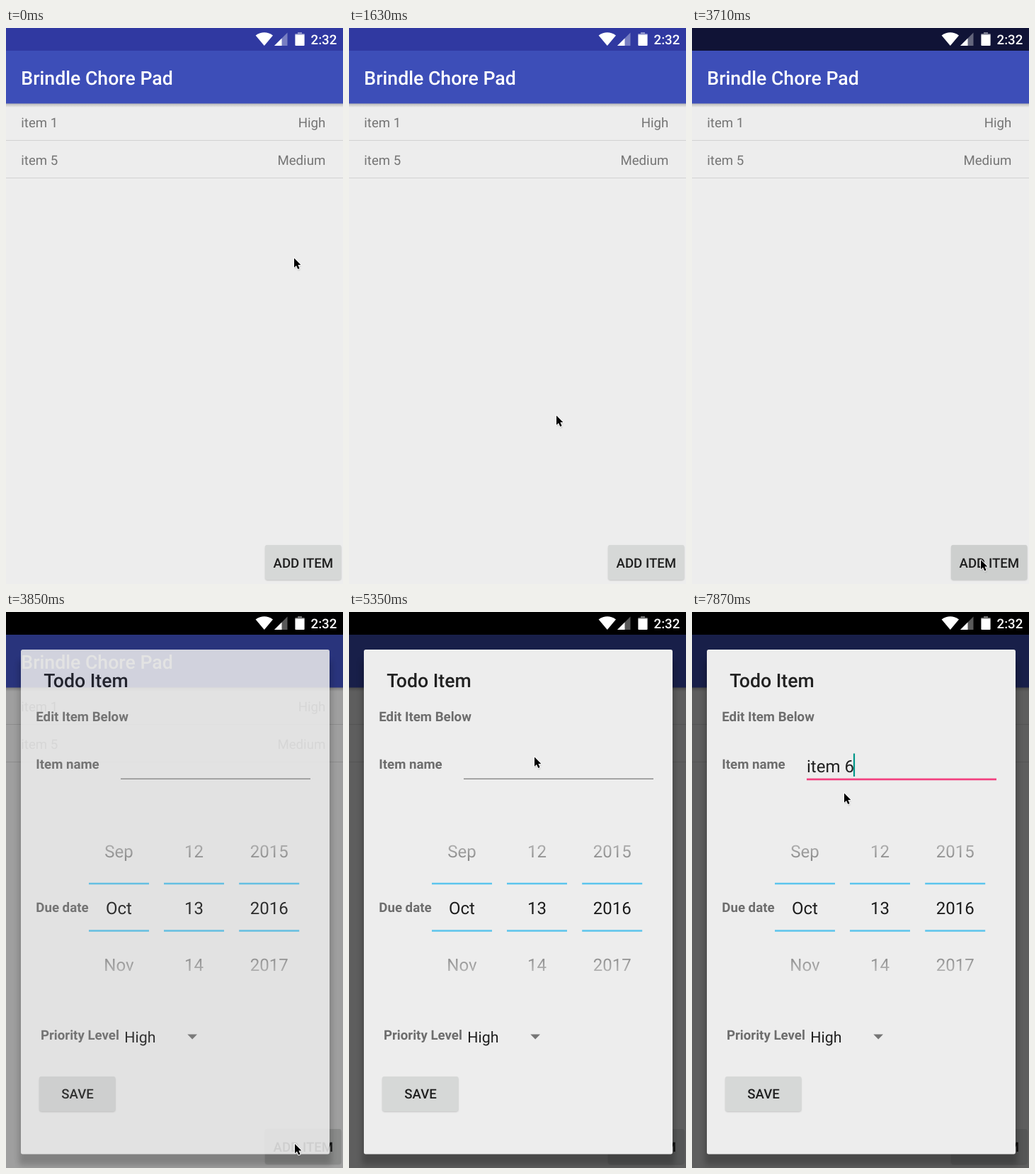
These frames come from a looping animation (476x784 px, 8 s). An HTML page:

```html
<!DOCTYPE html>
<html lang="en">
<head>
<meta charset="utf-8">
<title>Todo list</title>
<style>
  html, body { margin: 0; width: 100%; height: 100%; overflow: hidden; background: #ededed; }
  svg { display: block; width: 476px; height: 784px; }
  text { font-family: Roboto, sans-serif; font-size: 18.67px; text-rendering: geometricPrecision; white-space: pre; }
  .medium { font-weight: 500; }
  .title { font-size: 26.67px; font-weight: 500; }
  .row { fill: #757575; }
  .label { fill: #6d6d6d; font-weight: 700; }
  .pick { font-size: 24px; text-anchor: middle; fill: url(#fade); }
  .end { text-anchor: end; }
  .mid { text-anchor: middle; }
</style>
</head>
<body>
<svg viewBox="0 0 476 784">
  <defs>
    <linearGradient id="under" x1="0" y1="0" x2="0" y2="1">
      <stop offset="0" stop-color="#000" stop-opacity=".25"/>
      <stop offset="1" stop-color="#000" stop-opacity="0"/>
    </linearGradient>
    <linearGradient id="fade" gradientUnits="userSpaceOnUse" x1="0" y1="297" x2="0" y2="537">
      <stop offset="0" stop-color="#1c1c1c" stop-opacity="0"/>
      <stop offset=".45" stop-color="#1c1c1c"/>
      <stop offset=".55" stop-color="#1c1c1c"/>
      <stop offset="1" stop-color="#1c1c1c" stop-opacity="0"/>
    </linearGradient>
    <filter id="soft" x="-10%" y="-10%" width="120%" height="120%"><feGaussianBlur stdDeviation="4"/></filter>
    <filter id="tight" x="-10%" y="-20%" width="120%" height="140%"><feGaussianBlur stdDeviation="1"/></filter>
  </defs>

  <g id="list">
    <rect width="476" height="784" fill="#ededed"/>
    <rect y="106" width="476" height="6" fill="url(#under)"/>
    <rect y="32" width="476" height="74.5" fill="#3d4eb8"/>
    <text class="title" x="21.3" y="79.8" fill="#fff">Brindle Chore Pad</text>
    <g class="row">
      <text x="21.3" y="140">item 1</text>
      <text class="end" x="451.3" y="140">High</text>
      <text x="21.3" y="192.7">item 5</text>
      <text class="end" x="451.3" y="192.7">Medium</text>
    </g>
    <path d="M0 158.5H476M0 211.5H476" stroke="#d2d2d2"/>
    <rect x="366.5" y="730.5" width="106.5" height="48" rx="2.5" opacity=".25" filter="url(#tight)"/>
    <rect id="add" x="366" y="729" width="107.5" height="49" rx="2.5"/>
    <text class="medium mid" x="419.8" y="760.6" fill="#1f1f1f">ADD ITEM</text>
  </g>

  <rect id="dim" width="476" height="784"/>

  <g id="dialog">
    <rect x="18" y="68" width="442" height="712" rx="4" opacity=".22" filter="url(#soft)"/>
    <rect x="21" y="53" width="436" height="711.5" rx="2.7" fill="#ededed"/>
    <text class="title" x="53.3" y="105.8" fill="#212121">Todo Item</text>
    <text class="label" x="42.3" y="154.4">Edit Item Below</text>
    <text class="label" x="42.3" y="221">Item name</text>
    <text class="label" x="42.3" y="423">Due date</text>
    <text class="label" x="49" y="603.4">Priority Level</text>
    <rect id="line" x="162" width="268"/>
    <text id="entry" x="162" y="225.6" fill="#1f1f1f" style="font-size:24px"></text>
    <rect id="caret" y="199.5" width="2.2" height="32.5" fill="#009688"/>
    <g id="picker"></g>
    <text x="167.3" y="607.4" fill="#1f1f1f" style="font-size:21.33px">High</text>
    <path d="M256.3 595.5H270L263.2 602.6Z" fill="#757575"/>
    <rect x="47.5" y="656.5" width="106.5" height="48" rx="2.5" opacity=".25" filter="url(#tight)"/>
    <rect x="47" y="655" width="107.5" height="49" rx="2.5" fill="#d6d8d7"/>
    <text class="medium mid" x="101" y="686.4" fill="#1f1f1f">SAVE</text>
  </g>

  <g id="status" fill="#fff">
    <rect id="bar" width="476" height="32"/>
    <path d="M364.8 25L352.6 10.4Q364.8 2.2 377 10.4Z"/>
    <path d="M379 25H397.5V6.5Z" opacity=".35"/>
    <path d="M379 25H389.5V14.5Z"/>
    <path d="M408.4 10V8H412V6H418V8H421.6V10Z" opacity=".45"/>
    <path d="M408.4 9.5H421.6V24Q421.6 25 420.6 25H409.4Q408.4 25 408.4 24Z"/>
    <text class="medium end" x="467.3" y="23">2:32</text>
  </g>

  <g id="mouse">
    <path d="M0 0V13.2L3 10.4L5.3 15.6L7.6 14.6L5.4 9.5H9.4Z" transform="translate(.6 1.6)" opacity=".3" filter="url(#tight)"/>
    <path d="M0 0V13.2L3 10.4L5.3 15.6L7.6 14.6L5.4 9.5H9.4Z" stroke="#fff" stroke-width="1.8" paint-order="stroke" stroke-linejoin="round"/>
  </g>
</svg>
<script>
const LOOP = 8000;
const $ = id => document.getElementById(id);
const set = (id, attrs) => {
  for (const key in attrs) $(id).setAttribute(key, attrs[key]);
};

const wheels = [
  [159.5, 'Sep', 'Oct', 'Nov'],
  [265.5, '12', '13', '14'],
  [371.7, '2015', '2016', '2017']
];
$('picker').innerHTML = wheels.map(([x, ...words]) =>
  words.map((word, i) => `<text class="pick" x="${x}" y="${346.4 + i * 79.6}">${word}</text>`).join('') +
  `<path d="M${x - 42.5} 383h85m-85 66.5h85" stroke="#5cc5ed" stroke-width="2.6"/>`
).join('');

// the dialog opens in hard steps
const openTimes = [3710, 3850, 4000];
const looks = [
  { bar: '#3039a1', add: '#d6d8d7', dim: 0, dialog: 0 },
  { bar: '#101336', add: '#cdcfce', dim: 0, dialog: 0 },
  { bar: '#000', add: '#cdcfce', dim: .33, dialog: .86 },
  { bar: '#000', add: '#d6d8d7', dim: .6, dialog: 1 }
];

// start, end, steps, then the from, bend and to points of a curve
const moves = [
  [150, 300, 2, [407, 324.5], [300, 336], [211, 335]],
  [1050, 1630, 5, [211, 335], [211, 143], [293, 546.5]],
  [1930, 2660, 6, [293, 546.5], [428, 690], [408, 750]],
  [4750, 5350, 5, [408, 750], [170, 400], [262, 204.5]],
  [7870, 7870, 1, [262, 204.5], [240, 230], [215, 255.5]]
];

// how many of n evenly spaced steps have happened by time t
function stepsDone(t, start, end, n) {
  if (t < start) return 0;
  if (t >= end) return n;
  return 1 + Math.floor((t - start) / (end - start) * (n - 1));
}

const smooth = u => u * u * (3 - 2 * u);
const bend = (a, b, c, u) => (1 - u) ** 2 * a + 2 * u * (1 - u) * b + u * u * c;

function mouseAt(t) {
  let pos = moves[0][3];
  for (const [start, end, n, from, via, to] of moves) {
    if (t < start) break;
    const u = smooth(stepsDone(t, start, end, n) / n);
    pos = [0, 1].map(i => bend(from[i], via[i], to[i], u));
  }
  return pos;
}

function draw(t) {
  const look = looks[openTimes.filter(time => t >= time).length];
  set('bar', { fill: look.bar });
  set('add', { fill: look.add });
  set('dim', { opacity: look.dim });
  set('dialog', { opacity: look.dialog });

  const focus = t >= 5800;
  set('line', focus
    ? { y: 234.6, height: 2.7, fill: '#f2407f' }
    : { y: 234.6, height: 1.4, fill: '#868686' });

  const count = stepsDone(t, 6240, 6830, 5) + (t >= 7570 ? 1 : 0);
  $('entry').textContent = 'item 6'.slice(0, count);
  const width = count ? $('entry').getComputedTextLength() : 0;
  const blink = t >= 7280 && t < 7570;
  set('caret', { x: 162 + Math.max(0, width - 1), opacity: focus && !blink ? 1 : 0 });

  set('mouse', { transform: `translate(${mouseAt(t)})` });
}

function tick() {
  draw(performance.now() % LOOP);
  requestAnimationFrame(tick);
}
tick();
</script>
</body>
</html>
```
